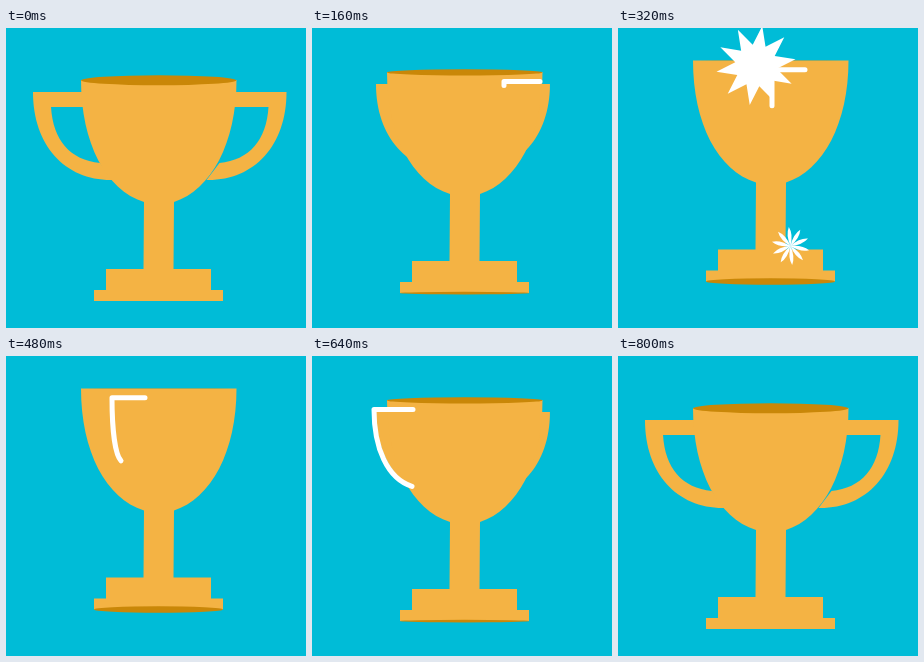
Write an HTML page that moves like this. It is 300 px wide and 300 px high and loops after 0.88 s.

```html
<!DOCTYPE html>
<html lang="en">
<head>
<meta charset="utf-8">
<title>Turning trophy</title>
<style>
  html, body { margin: 0; width: 100%; height: 100%; overflow: hidden; background: #00bcd7; }
  svg { display: block; width: 100vw; height: 100vh; }
  .gold { fill: #f4b344; }
  .dark { fill: #c98708; }
  .white { fill: #fff; }
  #shine { fill: none; stroke: #fff; stroke-width: 5; stroke-linecap: round; stroke-linejoin: round; }
</style>
</head>
<body>
<svg viewBox="0 0 300 300">
  <defs>
    <path id="handle" d="M27 64H95V79H45C47 112 64 132 94 135L107 152C60 153 27 118 27 64Z"/>
  </defs>
  <g id="cup" class="gold">
    <use id="left" href="#handle"/>
    <use id="right" href="#handle"/>
    <path d="M75 52H230.5C230.5 115 205 162 168 174L167.5 241H205V262H217V273H88V262H100V241H137.5L138 174C100 162 75 115 75 52Z"/>
    <ellipse id="rim" class="dark" cx="152.7" cy="52.3" rx="77.7"/>
    <ellipse id="foot" class="dark" cx="152.5" cy="273" rx="64.5"/>
  </g>
  <path id="shine"/>
  <path id="burst" class="white"/>
  <path id="spark" class="white"/>
</svg>
<script>
const LOOP = 880, TURN = 800, STEP = 40, RISE = 20;

// time, corner x, arm length, tail dx, tail dy
const SHINE = [
  [60, 230, 0, 0, 0],
  [160, 192, 36, 0, 4],
  [320, 154, 33, 0, 36],
  [480, 106, 33, 9, 63],
  [640, 62, 39, 38, 77],
  [720, 45, 37, 61, 87],
  [800, 27, 36, 78, 90]
];

const $ = id => document.getElementById(id);
const set = (id, name, value) => $(id).setAttribute(name, value);
const clamp = v => Math.max(0, Math.min(1, v));
const ease = p => p < .5 ? 2 * p * p : 1 - 2 * (1 - p) ** 2;
const polar = (r, deg) => {
  const a = deg * Math.PI / 180;
  return (r * Math.cos(a)).toFixed(2) + ' ' + (r * Math.sin(a)).toFixed(2);
};

function pick(table, t) {
  let i = 1;
  while (i < table.length - 1 && t > table[i][0]) i++;
  const a = table[i - 1], b = table[i];
  const p = clamp((t - a[0]) / (b[0] - a[0]));
  return a.map((v, k) => v + (b[k] - v) * p);
}

let star = '', petals = '';
for (let k = 0; k < 10; k++) {
  const a = 27 + 36 * k, b = -95 + 36 * k;
  star += (k ? 'L' : 'M') + polar(40, a) + 'L' + polar(21, a + 18);
  petals += 'M0 0Q' + polar(12, b - 19) + ' ' + polar(19, b) + 'Q' + polar(12, b + 19) + ' 0 0Z';
}
set('burst', 'd', star + 'Z');
set('spark', 'd', petals);

function pop(id, x, y, t, from, peak, to) {
  const s = t < peak ? clamp((t - from) / (peak - from)) : clamp((to - t) / (to - peak));
  set(id, 'transform', `translate(${x} ${y}) scale(${s})`);
  set(id, 'visibility', s > 0 ? 'visible' : 'hidden');
}

function draw(t) {
  const near = Math.min(t, TURN - t);
  const tilt = ease(clamp(near / 360));
  const lift = -RISE * tilt;
  set('cup', 'transform', `translate(0 ${lift})`);
  set('rim', 'ry', 5 * (1 - tilt));
  set('foot', 'ry', 3.3 * tilt);

  const n = near / 80;
  const shift = 22.5 * n - 2 * n * n;
  set('left', 'transform', `translate(${shift} 0)`);
  set('right', 'transform', `translate(${307.5 - shift * 1.15} 0) scale(-1 1)`);

  const [, x, arm, dx, dy] = pick(SHINE, t);
  const y = 61.3 + lift;
  set('shine', 'd', `M${x + arm} ${y}H${x}C${x} ${y + dy * .5} ${x + dx * .35} ${y + dy * .9} ${x + dx} ${y + dy}`);
  set('shine', 'opacity', t <= 60 ? 0 : clamp(t <= 720 ? 1 - (t - 640) / 320 : .75 * (TURN - t) / 80));

  pop('burst', 138, 37.5, t, 200, 320, 440);
  pop('spark', 172.5, 218, t, 240, 320, 440);
}

function tick() {
  const t = performance.now() % LOOP;
  draw(Math.min(TURN, Math.floor(t / STEP) * STEP));
  requestAnimationFrame(tick);
}
tick();
</script>
</body>
</html>
```
